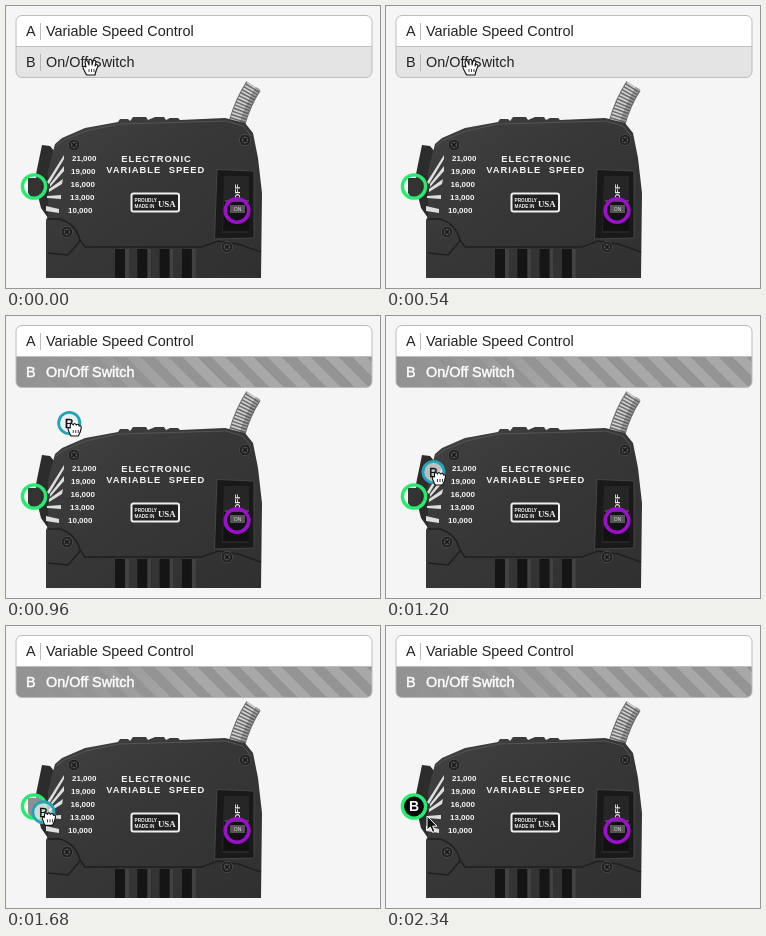
An HTML page that plays this animation: 374 px wide and 282 px high, repeating every 2400 ms.

```html
<!DOCTYPE html>
<html lang="en">
<head>
<meta charset="utf-8">
<title>Label drag and drop</title>
<style>
html, body { margin: 0; width: 100%; height: 100%; overflow: hidden; background: #f5f5f5; }
svg { display: block; width: 374px; height: 282px; font-family: "Liberation Sans", Arial, sans-serif; }
.row { font-size: 14.4px; fill: #222; }
.row.taken { fill: #fff; stroke: #fff; stroke-width: .45; }
.print { fill: #f4f4f4; font-weight: bold; }
.title { font-size: 9.4px; letter-spacing: .95px; word-spacing: 4px; text-anchor: middle; }
</style>
</head>
<body>
<svg viewBox="0 0 374 282">
  <defs>
    <linearGradient id="case" x1="0" y1="0" x2="1" y2="1">
      <stop offset="0" stop-color="#414142"/>
      <stop offset=".45" stop-color="#373738"/>
      <stop offset="1" stop-color="#303031"/>
    </linearGradient>
    <linearGradient id="stripes" gradientUnits="userSpaceOnUse" x1="10" y1="72" x2="24.14" y2="57.86" spreadMethod="repeat">
      <stop offset=".5" stop-color="#a8a8a8"/>
      <stop offset=".5" stop-color="#949494"/>
    </linearGradient>
    <linearGradient id="fade">
      <stop offset="0" stop-color="#929292"/>
      <stop offset=".25" stop-color="#949494" stop-opacity=".7"/>
      <stop offset=".5" stop-color="#949494" stop-opacity="0"/>
    </linearGradient>
    <clipPath id="panel"><rect x="10" y="9.5" width="356" height="62" rx="6"/></clipPath>
    <g id="screw">
      <circle r="5.6" fill="#1c1c1c" stroke="#505050" stroke-width=".8"/>
      <circle r="3.4" fill="#4c4c4c"/>
      <path d="M-2 -2L2 2M2 -2L-2 2" stroke="#151515" stroke-width="1.2"/>
    </g>
  </defs>

  <path fill="#f5f5f5" d="M0 0H374V282H0Z"/>

  <!-- device -->
  <path d="M247.5 80Q237 96 231 117" fill="none" stroke="#6a6a6a" stroke-width="17"/>
  <path d="M247.5 80Q237 96 231 117" fill="none" stroke="#cfcfcf" stroke-width="15" stroke-dasharray="1.7 1.5"/>
  <path d="M252 82Q242 98 236 117" fill="none" stroke="#444" stroke-opacity=".35" stroke-width="5"/>
  <path fill="#2c2c2d" d="M36 139L44 140L49 146V206L42 212L35 202L31 186L30 168Z"/>
  <path fill="#333" d="M22 172H35V191H25L22 187Z"/>
  <path fill="url(#case)" d="M49 138L56 132L79 122L112 116L114 113H122L124 115L127 111H140L142 114L149 111H158L160 114L164 112H172L174 114L219 112L239 117L247 127L252 152L256 187L255 272H40V214L42 210V165Z"/>
  <path fill="none" stroke="#555556" d="M50 140L58 134L80 125L113 118L220 115L237 120L245 130"/>
  <path fill="none" stroke="#1f1f1f" stroke-width="1.5" d="M42 213L54 213Q70 218 74 234L79 241H196L212 235L232 238L255 246M74 235L62 249L42 247"/>
  <g id="slots"></g>
  <use href="#screw" x="68" y="139"/>
  <use href="#screw" x="239" y="134"/>
  <use href="#screw" x="61" y="226"/>
  <use href="#screw" x="221" y="241"/>
  <g fill="#dedede">
    <path d="M41 176L58 149V153L43 178Z"/>
    <path d="M44 178L58 160V165L44 181Z"/>
    <path d="M43 183L57 173L56 178L43 186Z"/>
    <path d="M41 190L55 189V193L41 192Z"/>
    <path d="M40 200L53 203V207L40 205Z"/>
  </g>
  <g id="scale" class="print" font-size="8"></g>
  <text class="print title" x="150.5" y="156.3">ELECTRONIC</text>
  <text class="print title" x="149.8" y="166.8">VARIABLE SPEED</text>
  <rect x="125.5" y="187.5" width="47.5" height="18" rx="2" fill="#202020" stroke="#eee" stroke-width="2"/>
  <g class="print">
    <text x="128.5" y="196" font-size="4.7">PROUDLY</text>
    <text x="128.5" y="202" font-size="4.7">MADE IN</text>
    <text x="152" y="201" font-size="8.8" font-family="Liberation Serif, serif">USA</text>
  </g>
  <path fill="#191919" stroke="#454545" d="M211 163.5L248 165V232L208.5 233Z"/>
  <path fill="#262626" d="M218 170H243V227H216Z"/>
  <path fill="#111" d="M218 196H243V225H217Z"/>
  <path fill="#484848" d="M219 194H243V196H219Z"/>
  <text class="print" font-size="8" transform="translate(233.5 194) rotate(-90)">OFF</text>
  <path fill="#555" d="M224 199H239V207H224Z"/>
  <text x="231.5" y="205" font-size="5" fill="#ddd" text-anchor="middle">ON</text>
  <circle cx="231" cy="204.5" r="11.8" fill="none" stroke="#9c10cc" stroke-width="3.6"/>

  <!-- label list -->
  <g clip-path="url(#panel)">
    <path fill="#fff" d="M10 9H367V41H10Z"/>
    <path fill="#e4e4e4" d="M10 41H367V72H10Z"/>
    <g id="taken">
      <path fill="url(#stripes)" d="M10 41H367V72H10Z"/>
      <path fill="url(#fade)" d="M10 41H367V72H10Z"/>
    </g>
  </g>
  <path stroke="#bdbdbd" d="M10 40.5H366M34.5 17V34"/>
  <path id="split" stroke="#b5b5b5" d="M34.5 48V65"/>
  <rect x="10" y="9.5" width="356" height="62" rx="6" fill="none" stroke="#bcbcbc"/>
  <g class="row"><text x="20" y="30">A</text><text x="40" y="30">Variable Speed Control</text></g>
  <g class="row" id="rowB"><text x="20" y="61">B</text><text x="40" y="61">On/Off Switch</text></g>

  <!-- drop zone, dragged badge and pointers -->
  <circle id="zone" cx="28" cy="180.5" r="11.6" stroke="#29ea70" stroke-width="3.4"/>
  <text id="placed" x="28" y="185.3" font-size="14" font-weight="bold" fill="#fff" text-anchor="middle">B</text>
  <g id="badge">
    <circle r="10.6" fill="#e9eef0" fill-opacity=".75" stroke="#23a3b5" stroke-width="2.8"/>
    <text y="4.7" font-size="13.5" fill="#111" stroke="#111" stroke-width=".3" text-anchor="middle">B</text>
  </g>
  <g id="hand" fill="#fff" stroke="#111" stroke-width="1.1" stroke-linejoin="round">
    <path id="open" d="M-4 7L-7 1Q-7 -2 -4 0L-5 -5Q-4 -8 -2 -5L-1 -2V-7Q1 -9 2 -6V-2L3 -6Q5 -8 6 -5L5 -1Q7 -4 8 -1L6 4L5 8H-3Z"/>
    <path id="fist" d="M-4 7L-6 2Q-7 -1 -4 0V-3Q-3 -6 -1 -3Q0 -6 2 -3Q4 -5 5 -2Q7 -3 7 0L6 4L4 8H-3Z"/>
    <path fill="none" d="M-1 2V5M1.5 2V5M4 2V5" stroke-width=".8"/>
  </g>
  <path id="arrow" d="M41 190V204L44.3 201L46.6 206.4L49 205.4L46.7 200.2H51Z" fill="#111" stroke="#fff" stroke-width="1"/>
</svg>
<script>
const LOOP = 2400, STEP = 60, GRAB = 660, DROP = 2280;
const $ = id => document.getElementById(id);
const show = (id, on) => $(id).setAttribute("visibility", on ? "visible" : "hidden");
const place = (id, x, y) => $(id).setAttribute("transform", `translate(${x} ${y})`);

["21,000", "19,000", "16,000", "13,000", "10,000"].forEach((label, i) => {
  const x = [66, 65, 64.5, 64, 62][i];
  $("scale").innerHTML += `<text x="${x}" y="${154.7 + i * 13.1}">${label}</text>`;
});
for (let i = 0; i < 4; i++) {
  const x = 109 + i * 22.3;
  $("slots").innerHTML += `<path fill="#151515" d="M${x} 243h14v29h-14Z"/><path fill="#424242" d="M${x + 10} 243h4v29h-4Z"/>`;
}

// time, x, y of the badge
const path = [[720, 79, 58], [1200, 47.5, 156], [1500, 38.5, 185], [1920, 37, 187], [2400, 37, 187]];

function along(t) {
  if (t <= path[0][0]) return path[0].slice(1);
  const i = path.findIndex(p => p[0] > t);
  const [a, b] = [path[i - 1], path[i]];
  let k = (t - a[0]) / (b[0] - a[0]);
  k = i === 1 ? k * (1 + 3 * k - 2 * k * k) / 2 : 1 - (1 - k) ** 2;
  return [a[1] + (b[1] - a[1]) * k, a[2] + (b[2] - a[2]) * k];
}

function draw(time) {
  const t = Math.floor(time % LOOP / STEP) * STEP;
  const taken = t >= GRAB, dropped = t >= DROP, dragging = taken && !dropped;
  const [x, y] = along(t);
  const over = dragging && Math.hypot(x - 28, y - 180.5) < 20;
  show("taken", taken);
  show("split", !taken);
  $("rowB").classList.toggle("taken", taken);
  show("badge", dragging);
  show("hand", !dropped);
  show("open", !taken);
  show("fist", dragging);
  show("arrow", dropped);
  show("placed", dropped);
  $("zone").setAttribute("fill", dropped ? "#080808" : over ? "rgba(255,255,255,.45)" : "none");
  place("badge", x, y);
  place("hand", x + 5, taken ? y + 5 : y + 3);
}

const start = performance.now();
function tick() {
  draw(performance.now() - start);
  requestAnimationFrame(tick);
}
tick();
</script>
</body>
</html>
```
